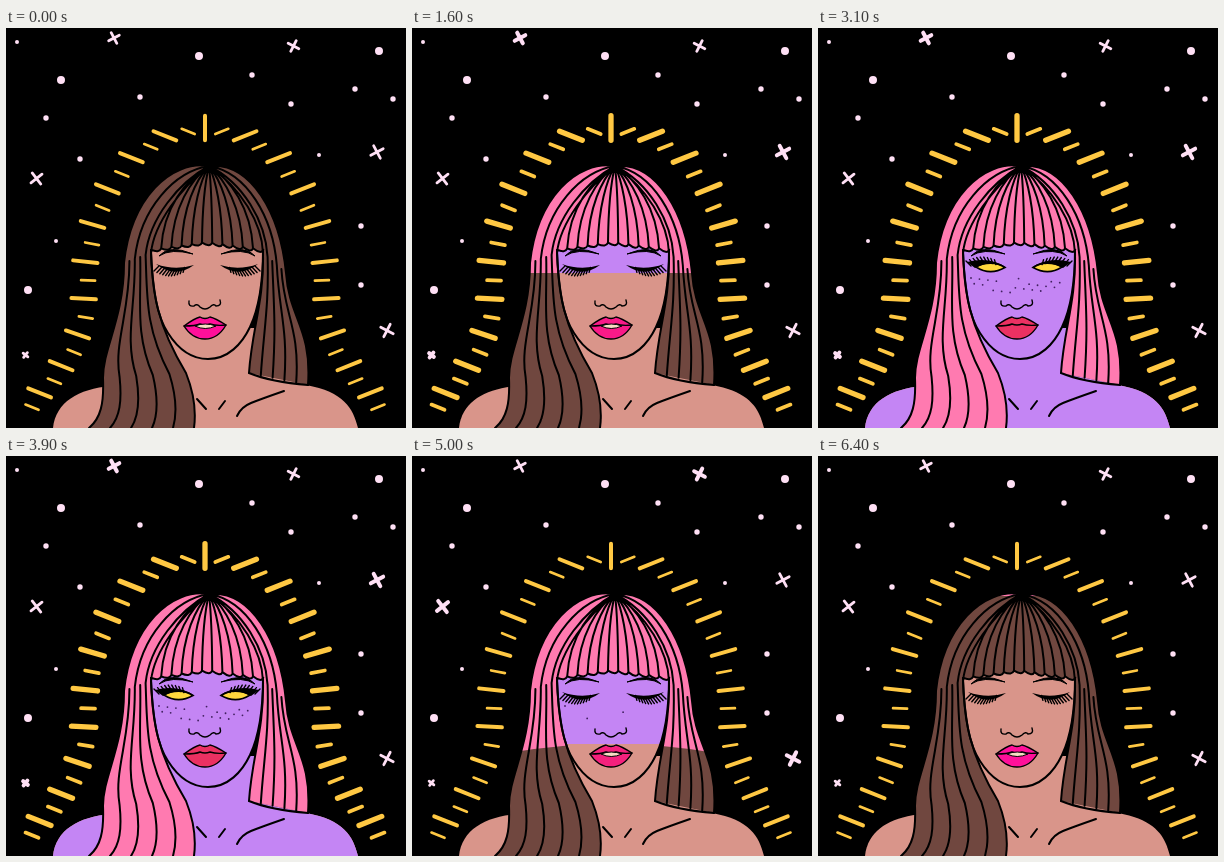
An HTML page for the animation above (6500 ms loop, 400 by 400 pixels).

```html
<!DOCTYPE html>
<html lang="en">
<head>
<meta charset="utf-8">
<title>Awakening</title>
<style>
  html, body { margin: 0; width: 100%; height: 100%; overflow: hidden; background: #000; }
  svg { display: block; width: 100vw; height: 100vh; }
  .calm { --skin: #d9958a; --hair: #70473f; }
  .cosmic { --skin: #c485f4; --hair: #ff7ab0; }
  .skin { fill: var(--skin); }
  .hair { fill: var(--hair); }
  .ink { fill: none; stroke: #000; stroke-width: 2; stroke-linecap: round; stroke-linejoin: round; }
  .fine { stroke-width: 1.4; }
  .rays, .dots, .sparkles { fill: none; stroke-linecap: round; }
  .rays { stroke: #ffc843; }
  .long { stroke-width: 4; }
  .short { stroke-width: 2.7; }
  .dots, .sparkles { stroke: #ffe0f5; }
  .sparkles { stroke-width: 2.8; }
  /* Three-beat twinkle: rest, rays and first stars, second stars. */
  [data-beat="1"] .long { stroke-width: 5.3; }
  [data-beat="1"] .short { stroke-width: 3.7; }
  [data-beat="1"] .first, [data-beat="2"] .second { stroke-width: 4; }
</style>
</head>
<body>
<svg id="stage" viewBox="0 0 400 400">
  <defs>
    <clipPath id="hairWipe"><path id="hairEdge"/></clipPath>
    <clipPath id="skinWipe"><path id="skinEdge"/></clipPath>
    <g id="skin" class="skin">
      <path d="M47 400C50 374 72 361 105 358L150 300H250L262 340L300 357C338 364 347 380 352 400Z"/>
      <path d="M145 212V230C146 265 152 290 162 305C174 324 187 331 202 331C222 331 236 316 244 299C253 280 257 250 257 212Z"/>
    </g>
    <g id="hair" class="hair">
      <path id="leftLock"/><path id="rightLock"/><path id="fringe"/>
    </g>
    <path id="halo" d="M199 100C132 100 80 160 78 255C78 305 70 325 22 378"/>
  </defs>
  <rect width="400" height="400"/>
  <g class="dots">
    <path stroke-width="4" d="M11 14h0M50 213h0M313 127h0"/>
    <path stroke-width="5.4" d="M246 47h0M349 61h0M387 71h0M285 76h0M134 69h0M40 90h0M74 131h0M355 198h0M355 257h0"/>
    <path stroke-width="8" d="M55 52h0M193 28h0M373 23h0M22 262h0"/>
  </g>
  <g class="sparkles">
    <path class="first" transform="translate(108 10) rotate(-28)" d="M-6 0H6M0-6V6"/>
    <path class="first" transform="translate(371 124) rotate(-28)" d="M-7 0H7M0-7V7"/>
    <path class="first" transform="translate(19.5 327) rotate(38)" d="M-3 0H3M0-3V3"/>
    <path class="second" transform="translate(287.5 18) rotate(27)" d="M-6 0H6M0-6V6"/>
    <path class="second" transform="translate(30.5 150.5) rotate(52)" d="M-7 0H7M0-7V7"/>
    <path class="second" transform="translate(381 302.5) rotate(27)" d="M-7 0H7M0-7V7"/>
  </g>
  <g class="rays"><path id="longRays" class="long"/><path id="shortRays" class="short"/></g>

  <use href="#skin" class="calm"/>
  <g clip-path="url(#skinWipe)"><use href="#skin" class="cosmic"/></g>
  <use href="#hair" class="calm"/>
  <g clip-path="url(#hairWipe)"><use href="#hair" class="cosmic"/></g>

  <path class="ink" id="strands"/>
  <g class="ink">
    <path d="M145 222C146 265 152 290 162 305C174 324 187 331 202 331C222 331 236 316 244 299C253 280 257 250 257 222"/>
    <path d="M243 345Q265 354 302 357M191 371L200 381M213 381L219 373M231 388Q235 379 245 375T278 363"/>
    <path class="fine" d="M183 273Q182 279 188 278Q191 275 194 279Q199 283 204 279Q208 275 210 278Q216 278 214 272"/>
    <path class="fine" id="lips" d="M178 298Q189 290 194 289Q199 292 204 289Q209 290 220 297Q212 311 199 311Q186 311 178 298Z"/>
    <path class="fine" d="M178 298Q190 298 194 296Q199 298 204 296Q210 298 220 297"/>
  </g>
  <path id="teeth" d="M189 298Q199 294 210 298Q199 303 189 298Z" fill="#f8dcc4" stroke="#000"/>
  <path id="brows" stroke="#000" stroke-linejoin="round"/>
  <g id="closedEyes">
    <path id="shutLids"/>
    <path class="ink fine" id="lowLashes"/>
  </g>
  <g id="openEyes">
    <path id="irises" fill="#ffd83d" stroke="#000" stroke-width="1.5"/>
    <path id="lids"/>
    <path class="ink fine" id="highLashes"/>
  </g>
  <g id="freckles" fill="#40205f"></g>
</svg>
<script>
const $ = id => document.getElementById(id);
const setPath = (id, d) => $(id).setAttribute('d', d);
const show = (el, on) => el.style.display = on ? '' : 'none';
const range = n => [...Array(n).keys()];
const clamp = (v, lo, hi) => Math.min(hi, Math.max(lo, v));
const lerp = (a, b, u) => a + (b - a) * u;

// Rays stand across the halo, slightly closer together towards the shoulders.
function ray(i, length, inset) {
  const halo = $('halo');
  const s = 41.5 * i - .4 * i * i;
  const { x, y } = halo.getPointAtLength(s);
  const a = halo.getPointAtLength(Math.max(0, s - 2)), b = halo.getPointAtLength(s + 2);
  const angle = Math.min(Math.atan2(a.x - b.x, b.y - a.y), .38);
  const level = i ? angle : -Math.PI / 2;
  const dx = Math.cos(level), dy = Math.abs(Math.sin(level));
  const end = (side, d) => `${199 + side * (199 - x - dx * d)} ${y + dy * d}`;
  return [-1, 1].map(side =>
    `M${end(side, inset - length / 2)}L${end(side, inset + length / 2)}`).join('');
}
setPath('longRays', range(10).map(i => ray(i, 24.5, 0)).join(''));
setPath('shortRays', range(10).map(i => ray(i + .5, 14, 4)).join(''));

// A lock lies between two chains of cubics from the parting to the tips.
const locks = {
  left: {
    outer: [203, 138, 165, 132, 125, 170, 118, 235, 118, 290, 97, 320, 97, 350, 98, 375, 95, 390, 83, 400],
    inner: [203, 138, 175, 160, 148, 195, 145, 225, 147, 265, 150, 295, 180, 345, 188, 365, 190, 385, 188, 400]
  },
  right: {
    outer: [203, 138, 245, 134, 274, 185, 280, 245, 283, 290, 306, 300, 302, 357],
    inner: [203, 138, 235, 160, 256, 195, 257, 225, 258, 275, 246, 300, 243, 345]
  }
};
const curve = p => `M${p.slice(0, 2)}C${p.slice(2)}`;
const pairs = p => range(p.length / 2).map(i => p.slice(2 * i, 2 * i + 2));
let strands = '';
for (const [side, { outer, inner }] of Object.entries(locks)) {
  const back = pairs(inner).reverse().flat();
  setPath(side + 'Lock', `${curve(outer)}L${back.slice(0, 2)}C${back.slice(2)}Z`);
  // Every other strand starts below the temple.
  for (const i of range(6)) {
    const strand = outer.map((v, k) => lerp(v, inner[k], i / 5));
    strands += curve(i % 2 && i < 5 ? strand.slice(6) : strand);
  }
}

const tips = range(12).map(i => [145 + i * 10.2, 214 + Math.abs(i - 5.5) * 1.4]);
const fringeEdge = tips.slice(1).map(([x, y]) => `Q${x - 2} ${y + 5} ${x} ${y}`).join('');
setPath('fringe', `M203 138C175 160 148 195 ${tips[0]}${fringeEdge}C256 195 235 160 203 138Z`);
strands += `M${tips[0]}${fringeEdge}`;
for (const [x, y] of tips.slice(1, -1)) {
  strands += `M203 138C${lerp(203, x, .5)} 152 ${lerp(203, x, .95)} 180 ${x} ${y}`;
}
setPath('strands', strands);

// Facial features are drawn for the left side and mirrored.
const bothSides = stroke => stroke(x => x) + stroke(x => 402 - x);
setPath('brows', bothSides(m => `M${m(153)} 228Q${m(163)} 216 ${m(187)} 226Q${m(165)} 220 ${m(153)} 228Z`));
setPath('shutLids', bothSides(m => `M${m(150)} 236Q${m(169)} 243 ${m(188)} 237Q${m(169)} 251 ${m(150)} 236Z`));
const lashes = (count, bend, reach) => bothSides(m => range(count).map(i => {
  const u = i / count, x = 153 + u * 28, y = 238 + bend * Math.sin(u * Math.PI);
  return `M${m(x)} ${y}L${m(x - 5 + u * 4)} ${y + reach}`;
}).join(''));
setPath('lowLashes', lashes(11, 5, 5));
setPath('highLashes', lashes(9, -4, -5));

$('freckles').innerHTML = range(20).map(i =>
  `<circle cx="${153 + i * .618 % 1 * 94}" cy="${250 + i * .414 % 1 * 15}" r=".9"/>`).join('');
const freckles = [...$('freckles').children];

function drawWipe(step) {
  const n = step - 16, late = Math.max(0, n);
  const y = 245 + 10.5 * n + .015 * late ** 3;
  const sag = 8.4 * late;
  setPath('hairEdge', `M0 0H400V${y + sag}Q200 ${y - sag} 0 ${y + sag}Z`);
  setPath('skinEdge', `M0 0H400V${y}H0Z`);
}

function drawFace(step) {
  const open = clamp((step - 28) / 2, 0, 1), h = 9 * open;
  show($('closedEyes'), !open);
  show($('openEyes'), open);
  show($('teeth'), !open);
  setPath('irises', bothSides(m =>
    `M${m(158)} 239Q${m(172)} ${239 - h} ${m(187)} 239.5Q${m(172)} ${239 + h} ${m(158)} 239Z`));
  setPath('lids', bothSides(m =>
    `M${m(149)} 234Q${m(172)} ${237 - h} ${m(189)} 240Q${m(172)} ${241 - h} ${m(157)} 240Z`));
  const blush = clamp((step - 10) / 19, 0, 1);
  $('lips').style.fill = `rgb(${lerp(255, 235, blush)} ${lerp(16, 49, blush)} ${lerp(154, 98, blush)})`;
  freckles.forEach((dot, i) => show(dot, i < (step - 18) * 1.5));
}

function draw(time) {
  const tick = Math.floor(time % 6500 / 100);
  const step = tick <= 35 ? tick : 70 - tick;
  $('stage').dataset.beat = step % 3;
  drawWipe(step);
  drawFace(step);
}

function loop() {
  draw(performance.now());
  requestAnimationFrame(loop);
}
loop();
</script>
</body>
</html>
```
